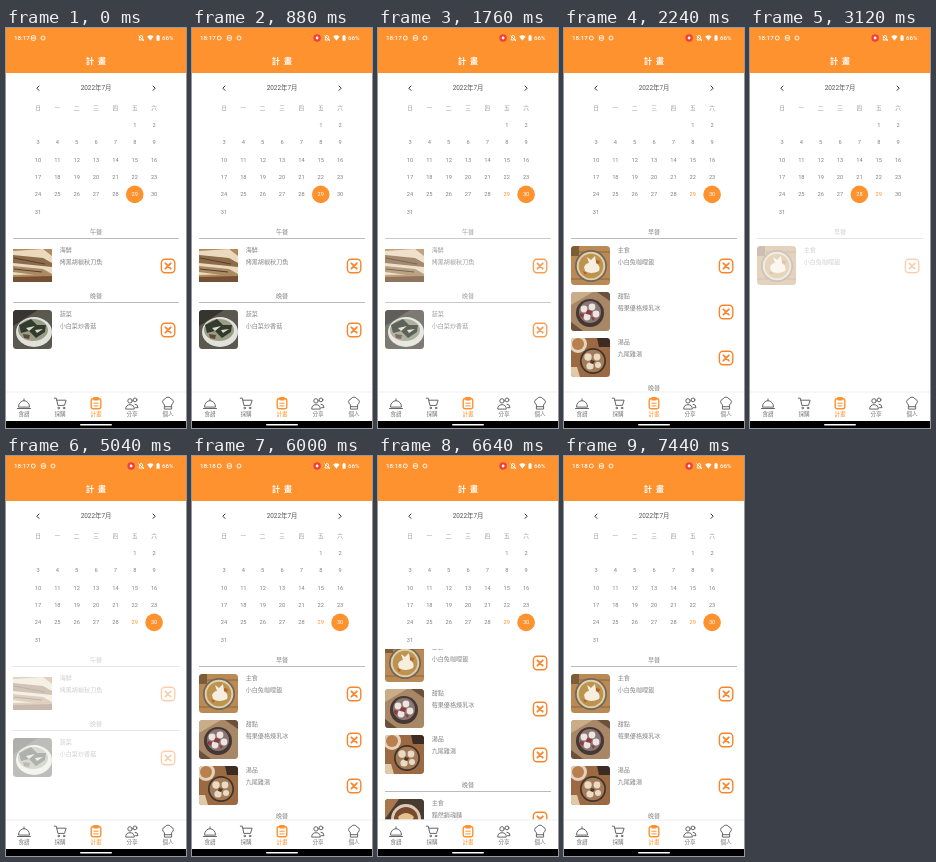
An HTML page for the animation above (8 s loop, 180 by 400 pixels).

```html
<!DOCTYPE html>
<html lang="zh-Hant">
<head>
<meta charset="utf-8">
<title>計畫</title>
<style>
html, body { margin: 0; width: 100%; height: 100%; overflow: hidden; background: #fff; }
svg { display: block; width: 180px; height: 400px; font-family: Roboto, "Noto Sans CJK TC", "Noto Sans CJK", sans-serif; }
text { dominant-baseline: central; }
.mid { text-anchor: middle; }
.line { fill: none; stroke: #666; stroke-width: 1; stroke-linecap: round; stroke-linejoin: round; }
.on { stroke: #fd922f; }
.anim { animation: 8s linear infinite; }
.jump { animation-timing-function: step-end; }

/* One percent of the loop is 80 ms. */
.list29 { animation-name: list29; }
.list30 { animation-name: list30; }
.list28 { animation-name: list28; }
@keyframes list29 {
  0%, 21.6% { opacity: 1 } 23.6%, 51.5% { opacity: 0 }
  53%, 61.5% { opacity: 1 } 64%, 99.9% { opacity: 0 } 100% { opacity: 1 }
}
@keyframes list30 {
  0%, 23.6% { opacity: 0 } 25%, 35.5% { opacity: 1 }
  38%, 64.3% { opacity: 0 } 66%, 99.9% { opacity: 1 } 100% { opacity: 0 }
}
@keyframes list28 {
  0%, 38.4% { opacity: 0 } 40%, 48.8% { opacity: 1 }
  51% { opacity: .07 } 51.5%, 100% { opacity: 0 }
}
.scroll { animation-name: scroll; }
@keyframes scroll {
  0%, 76.5% { transform: translateY(0); animation-timing-function: ease-in-out }
  83%, 84% { transform: translateY(-31px); animation-timing-function: ease-in-out }
  90%, 100% { transform: translateY(0) }
}
.pick29 { animation-name: pick29; }
.pick30 { animation-name: pick30; }
.pick28 { animation-name: pick28; }
@keyframes pick29 { 0% { opacity: 1 } 22% { opacity: 0 } 49% { opacity: 1 } 62%, 100% { opacity: 0 } }
@keyframes pick30 { 0% { opacity: 0 } 22% { opacity: 1 } 36% { opacity: 0 } 62%, 100% { opacity: 1 } }
@keyframes pick28 { 0% { opacity: 0 } 36% { opacity: 1 } 49%, 100% { opacity: 0 } }
.early { animation-name: early; }
.late { animation-name: late; }
@keyframes early { 0% { opacity: 1 } 75%, 100% { opacity: 0 } }
@keyframes late { 0% { opacity: 0 } 75%, 100% { opacity: 1 } }
.record { animation-name: record; }
@keyframes record { 0%, 2% { opacity: 0 } 7%, 100% { opacity: 1 } }
.push { animation-name: push; }
@keyframes push { 0%, 2% { transform: none } 7%, 100% { transform: translateX(10px) } }
</style>
</head>
<body>
<svg viewBox="0 0 180 400">
  <defs>
    <clipPath id="view"><rect y="193" width="180" height="171"/></clipPath>
    <clipPath id="round"><rect width="39" height="39" rx="3.5"/></clipPath>
    <clipPath id="wide"><rect y="3" width="39" height="33"/></clipPath>
    <g id="curry">
      <path fill="#b98a55" d="M0 0h39v39H0z"/>
      <path stroke="#8f6539" d="M0 6h39M0 33h39"/>
      <path fill="#7d5c38" d="M0 0h8v10H0z"/>
      <circle cx="20" cy="20" r="16" fill="#70665a"/>
      <circle cx="20" cy="20" r="14.3" fill="#e0cfa8"/>
      <circle cx="20" cy="20" r="12.3" fill="#bd9350"/>
      <path fill="#f6efdf" d="M13 21q2-4 5-4l-2-6 4 3 4-4 1 7q5 3 3 8-8 4-14 0z"/>
      <path fill="#b5602f" d="M25 14l4 1-1 3-3-1zM12 25l4 2-2 2z"/>
    </g>
    <g id="dessert">
      <path fill="#a78765" d="M0 0h39v39H0z"/>
      <path fill="#c9ad89" d="M0 0h22L0 13z"/>
      <path fill="#6b503b" d="M26 0h13v9zM0 30l12 9H0z"/>
      <circle cx="19" cy="21" r="14" fill="#453734"/>
      <circle cx="19" cy="20" r="11" fill="#8a7672"/>
      <g fill="#eee4e1">
        <circle cx="13" cy="17" r="3.4"/><circle cx="21" cy="15" r="3.4"/>
        <circle cx="25" cy="22" r="3.4"/><circle cx="16" cy="25" r="3.4"/>
      </g>
      <path fill="#8e3a40" d="M16 18l5 1-1 4-5-1zM9 21l4 1-1 4-3-2zM20 25l4 1-2 3z"/>
    </g>
    <g id="soup">
      <path fill="#9b6a43" d="M0 0h39v39H0z"/>
      <circle cx="7" cy="6" r="9" fill="#e3d3bd"/>
      <circle cx="7" cy="6" r="6" fill="#b9804d"/>
      <path fill="#3c2b22" d="M26 0h13v9H28z"/>
      <circle cx="22" cy="23" r="13" fill="#40332b"/>
      <circle cx="22" cy="23" r="11.3" fill="#a47b58"/>
      <g fill="#eadbc6">
        <circle cx="17" cy="19" r="3.7"/><circle cx="26" cy="19" r="3.4"/>
        <circle cx="19" cy="28" r="3.6"/><circle cx="27" cy="27" r="3"/>
      </g>
      <path fill="#4d3728" d="M20 22l4 1-2 3-3-1z"/>
      <path fill="#dfc9a8" d="M0 29h6l3 10H0z"/>
    </g>
    <g id="noodles">
      <path fill="#4a3b31" d="M0 0h39v39H0z"/>
      <path fill="#a8774b" d="M0 0h14L0 20z"/>
      <circle cx="21" cy="20" r="15" fill="#d9cbb8"/>
      <circle cx="21" cy="20" r="12" fill="#7a4a2e"/>
      <path fill="#e2c18c" d="M13 18q8-8 16 0l-4 8H16z"/>
    </g>
    <g id="fish">
      <path fill="#b38a5c" d="M0 0h39v39H0z"/>
      <path fill="#ead9bd" d="M0 5l30-2 9 7v18l-39 1z"/>
      <path fill="#8c6b49" d="M0 9l30 3 9 5v4L0 17z"/>
      <path fill="#a98a64" d="M0 20l30 3 9 5-9 2-30-4z"/>
      <path fill="none" stroke="#55402f" d="M1 12l31 6M1 23l28 3"/>
      <path fill="#755034" d="M0 31l39-1v9H0z"/>
    </g>
    <g id="greens">
      <path fill="#5a584f" d="M0 0h39v39H0z"/>
      <path fill="#36352f" d="M0 0h25L0 16z"/>
      <ellipse cx="21" cy="22" rx="18" ry="15" fill="#e2e2dc"/>
      <ellipse cx="20" cy="20" rx="15" ry="11" fill="#9a9d86"/>
      <path fill="#333b2e" d="M6 15l12-6 6 6 9 0-1 7-9 6-7-7-8 2z"/>
      <path fill="#dcdcc8" d="M13 18l9-2-6 5zM22 20l8-1-6 4z"/>
      <path fill="#5f4a37" d="M10 24l7 1-1 4-5-1z"/>
    </g>
    <g id="remove" fill="none" stroke="#f8852c" stroke-linecap="round">
      <rect x="155.4" y="13.3" width="13.4" height="13.4" rx="3.6" stroke-width="1.4"/>
      <path stroke-width="1.8" d="M159.4 17.3l5.4 5.4m0-5.4l-5.4 5.4"/>
    </g>
  </defs>

  <rect width="180" height="400" fill="#fff"/>
  <rect width="180" height="45" fill="#fd922f"/>

  <g fill="#fff" font-size="6.2" font-weight="500">
    <text class="anim jump early" x="8" y="9.6">18:17</text>
    <text class="anim jump late" x="8" y="9.6">18:18</text>
    <g fill="none" stroke="#fff" stroke-width=".9">
      <circle class="anim record" cx="27.3" cy="10" r="2"/>
      <g class="anim push">
        <rect x="25.4" y="7.7" width="4" height="4.6" rx="1"/>
        <path d="M26 10h2.8"/>
        <circle cx="37" cy="10" r="2"/>
      </g>
      <path d="M133 12h4.4l-.8-1.3V9a1.5 1.5 0 0 0-3 0v1.7zM132.5 7.5l5.5 5.5"/>
    </g>
    <g class="anim record">
      <circle cx="125.1" cy="10" r="3.7" fill="#ee3f38"/>
      <circle cx="125.1" cy="10" r="1.4"/>
    </g>
    <path d="M141.2 8.5q3.2-2.6 6.4 0l-3.2 4.2zM150.5 7.7h.8V7h1.5v.7h.8v5.1h-3.1z"/>
    <text x="156" y="9.6">66%</text>
  </g>
  <text class="mid" x="90" y="32.8" font-size="8.3" font-weight="700" word-spacing="1.6" fill="#fff">計 畫</text>

  <text class="mid" x="90" y="59.6" font-size="6.4" fill="#555">2022年7月</text>
  <path class="line" style="stroke:#333" d="M33 58l-2.2 2.2 2.2 2.2M147 58l2.2 2.2-2.2 2.2"/>
  <g id="calendar" class="mid" font-size="5.7" fill="#808080"></g>
  <g clip-path="url(#view)"><g id="lists" class="anim scroll"></g></g>

  <rect y="363.5" width="180" height="30" fill="#fff"/>
  <path stroke="#e8e8e8" stroke-width=".7" d="M0 364h180"/>
  <g transform="translate(0 -.8)">
    <g class="line">
      <path d="M12.5 379.5a5.5 6 0 0 1 11 0zM11.5 381.3h13M18 373.3v-1.6"/>
      <path d="M48.3 371h2l1.6 7.2h6.6l1.6-5.2h-9.3"/>
      <circle cx="52.7" cy="380.8" r=".8"/><circle cx="58" cy="380.8" r=".8"/>
      <circle cx="124" cy="373.7" r="2.2"/><circle cx="129" cy="372.7" r="1.9"/>
      <path d="M119.7 381.5q0-4 4.3-4t4.3 4zM129 377q3 0 3 3.5h-2.5"/>
      <path d="M158.4 381.5v-4.2a2.9 2.9 0 0 1 .5-5.5 3.5 3.5 0 0 1 6.2 0 2.9 2.9 0 0 1 .5 5.5v4.2zM158.4 379.5h7.2"/>
    </g>
    <rect class="line on" x="85.2" y="371.3" width="9.6" height="10.2" rx="2.2" style="stroke-width:1.4"/>
    <rect x="87.2" y="369.8" width="5.6" height="3.6" rx="1" fill="#fd922f"/>
    <path class="line on" d="M87.8 376h4.4M87.8 378.7h4.4"/>
    <g id="tabs" class="mid" font-size="5.6"></g>
  </g>

  <rect y="393" width="180" height="7" fill="#000"/>
  <rect x="74" y="396" width="32" height="1.6" rx=".8" fill="#fff"/>
</svg>
<script>
const $ = id => document.getElementById(id);
const label = (x, y, str, extra = '') => `<text x="${x}" y="${y}" ${extra}>${str}</text>`;

// Calendar: the first of the month falls on column 5.
const colX = c => 32 + c * 19.35;
const cell = day => [colX((day + 4) % 7), 96.8 + Math.floor((day + 4) / 7) * 17.4];
let cal = [...'日一二三四五六'].map((d, c) => label(colX(c), 79.6, d, 'fill="#999"')).join('');
for (let day = 1; day <= 31; day++) {
  cal += label(...cell(day), day, day === 29 ? 'fill="#fd922f"' : '');
}
for (const day of [28, 29, 30]) {
  const [x, y] = cell(day);
  cal += `<g class="anim jump pick${day}"><circle cx="${x}" cy="${y}" r="8.8" fill="#fd922f"/>${label(x, y, day, 'fill="#fff"')}</g>`;
}
$('calendar').innerHTML = cal;

// Meal plans: [section, [title, dish, picture]...]
const rabbit = ['主食', '小白兔咖哩飯', 'curry'];
const plans = {
  28: [['早餐', rabbit]],
  29: [['午餐', ['海鮮', '烤黑胡椒秋刀魚', 'fish']], ['晚餐', ['蔬菜', '小白菜炒香菇', 'greens']]],
  30: [
    ['早餐', rabbit, ['甜點', '莓果優格煉乳冰', 'dessert'], ['湯品', '九尾雞湯', 'soup']],
    ['晚餐', ['主食', '黯然銷魂麵', 'noodles']]
  ]
};

function meal([title, dish, pic], y) {
  const clip = pic === 'fish' ? 'wide' : 'round';
  return `<g transform="translate(0 ${y})">
    <g transform="translate(7 0)" clip-path="url(#${clip})"><use href="#${pic}"/></g>
    ${label(53.7, 3.4, title)}${label(53.7, 15.8, dish)}<use href="#remove"/></g>`;
}

function plan(day) {
  let y = 204, out = '';
  for (const [name, ...meals] of plans[day]) {
    out += label(90, y - .2, name, 'class="mid"');
    out += `<path stroke="#bbb" d="M7 ${y + 6.5}h166"/>`;
    meals.forEach((m, i) => out += meal(m, y + 14 + i * 46));
    y += 18 + meals.length * 46;
  }
  return `<g class="anim list${day}" font-size="6.1" fill="#858585">${out}</g>`;
}
$('lists').innerHTML = Object.keys(plans).map(plan).join('');

$('tabs').innerHTML = ['食譜', '採購', '計畫', '分享', '個人']
  .map((name, i) => label(18 + i * 36, 387, name, `fill="${i === 2 ? '#fd922f' : '#777'}"`)).join('');
</script>
</body>
</html>
```
